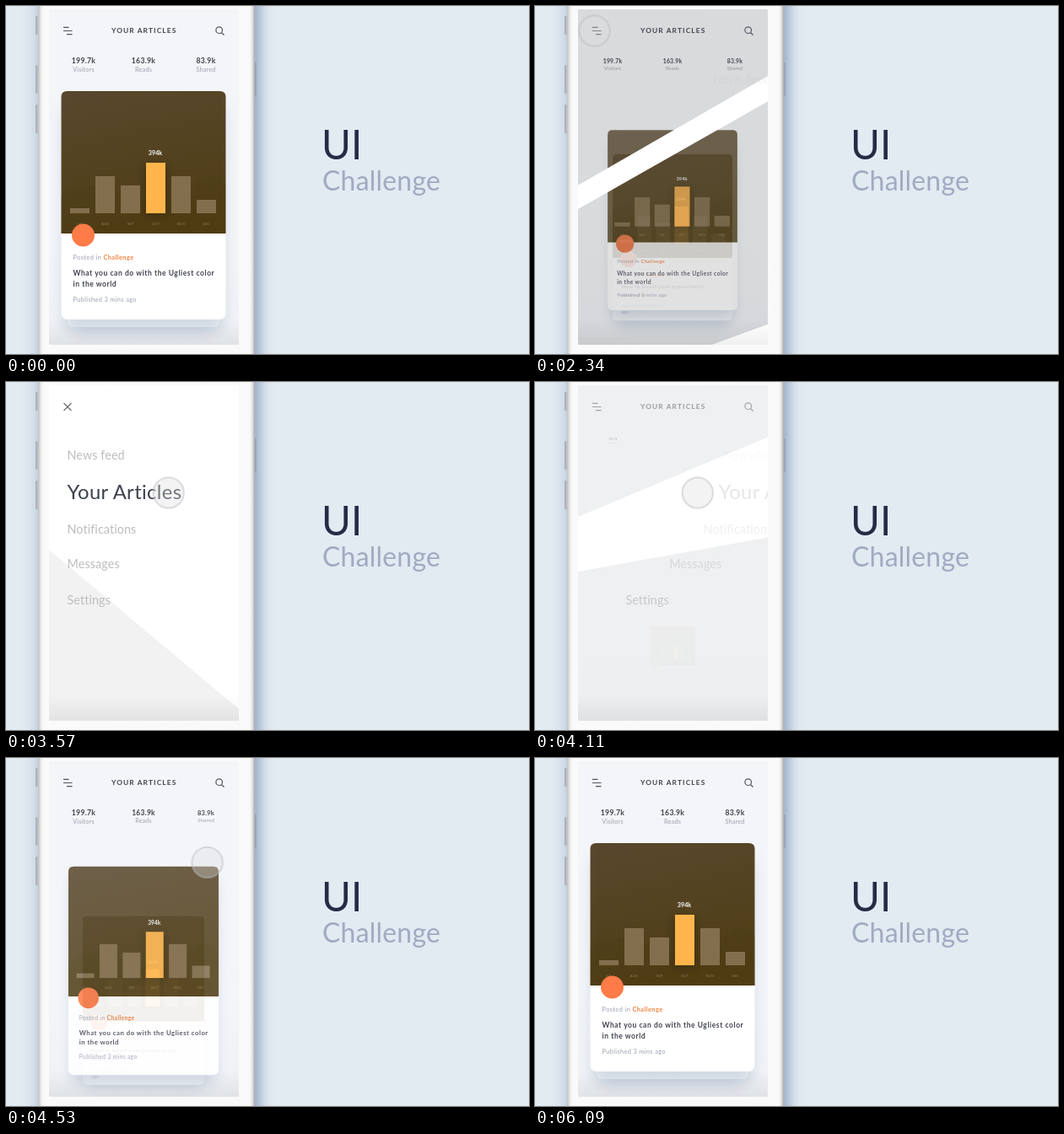
Recreate the animation shown at these times as an HTML page. Size 620 by 413 pixels, loop 6120 ms.

```html
<!DOCTYPE html>
<html lang="en">
<head>
<meta charset="utf-8">
<title>UI Challenge</title>
<style>
html, body { margin: 0; width: 100%; height: 100%; overflow: hidden; background: #e2eaf2; }
body { font-family: Lato, "Open Sans", sans-serif; }
.stage { position: absolute; left: 0; top: 0; width: 620px; height: 413px; overflow: hidden; background: #e2eaf2; }
.stage svg { position: absolute; left: 0; top: 0; display: block; }

.phone {
  position: absolute; left: 38px; top: -30px; width: 257px; height: 480px;
  background: linear-gradient(90deg, #c3bfbe, #d9d6d5 2px, #f1f0f0 4px, #fafafb 7px, #f9f9fa 251px, #efeded 253px, #d3cfce 255px, #a8a8ad);
  box-shadow: 6px 0 14px rgba(85, 115, 160, .5), -2px 0 16px rgba(120, 150, 185, .28);
}
.key { position: absolute; width: 3px; border-radius: 1px; background: linear-gradient(90deg, #b4b4b8, #d6d3d2); }

.screen { position: absolute; left: 51px; top: 4px; width: 225px; height: 398px; overflow: hidden; background: linear-gradient(#f3f5f8 70%, #eff2f5); }
.layer { position: absolute; inset: 0; }
.foot { top: 368px; background: linear-gradient(rgba(0,0,0,0), rgba(0,0,0,.06)); }

.paper, .dim, .wedge, .corner, .head, .cross, .front, .back, .stat, .item, .cursor {
  animation: 6120ms linear infinite both;
}
.paper { background: #fff; animation-name: paper; }
.dim { background: #000; animation-name: dim; }
.wedge { background: #fff; animation-name: wedge; }
.corner { background: #fff; animation-name: corner; }
.head { animation-name: head; }
.cross { animation-name: cross; }
.front { animation-name: front; }
.back { animation-name: back; }
.s0 { animation-name: stat0; }
.s1 { animation-name: stat1; }
.s2 { animation-name: stat2; }
.stat { transform-box: fill-box; transform-origin: center; }
.item { animation-name: item; animation-delay: calc(var(--i) * 40ms - 6120ms); }
.cursor { animation-name: cursor; }
.shade { filter: blur(9px); }
.glow { filter: blur(5px); }

@keyframes paper {
  0%, 34% { opacity: 0; }
  38.24% { opacity: .05; }
  41.18%, 63.24% { opacity: 1; }
  70.1% { opacity: .2; }
  73%, 100% { opacity: 0; }
}
@keyframes dim {
  0%, 32% { opacity: 0; }
  38.24% { opacity: .115; }
  41.3%, 63.24% { opacity: .05; }
  70.1% { opacity: .03; }
  73.8%, 100% { opacity: 0; }
}
@keyframes wedge {
  0%, 34.3% { clip-path: polygon(0 224px, 225px 94px, 225px 94px, 0 224px); animation-timing-function: ease-in; }
  38.24% { clip-path: polygon(0 209px, 225px 79px, 225px 109px, 0 237px); animation-timing-function: cubic-bezier(.4,.1,.3,1); }
  42.4%, 63.24% { clip-path: polygon(0 -2px, 225px -2px, 225px 384px, 0 195px); animation-timing-function: cubic-bezier(.5,0,.4,1); }
  70.1% { clip-path: polygon(0 217px, 225px 86px, 225px 102px, 0 231px); animation-timing-function: ease-out; }
  72.2%, 100% { clip-path: polygon(0 224px, 225px 94px, 225px 94px, 0 224px); }
}
@keyframes corner {
  0%, 35.5% { clip-path: polygon(225px 398px, 225px 398px, 225px 398px); opacity: 1; }
  38.24% { clip-path: polygon(159px 398px, 225px 374px, 225px 398px); opacity: 1; }
  41%, 100% { clip-path: polygon(60px 398px, 225px 330px, 225px 398px); opacity: 0; }
}
@keyframes head {
  0%, 38.7% { opacity: 1; }
  41.2%, 65.4% { opacity: 0; }
  69%, 100% { opacity: 1; }
}
@keyframes cross {
  0%, 39.7% { opacity: 0; }
  42.5%, 63.5% { opacity: 1; }
  66.2%, 100% { opacity: 0; }
}
@keyframes front {
  0%, 32.2% { transform: translate(163px, 236.5px) scale(1); opacity: 1; animation-timing-function: ease-in; }
  38.24% { transform: translate(163px, 254px) scale(.79); opacity: .78; }
  42% { transform: translate(163px, 305px) scale(.32); opacity: 0; }
  66% { transform: translate(163px, 330px) scale(.25); opacity: 0; animation-timing-function: ease-in; }
  70.1% { transform: translate(163px, 308.5px) scale(.44); opacity: .18; }
  74.02% { transform: translate(163px, 252.5px) scale(.913); opacity: .86; animation-timing-function: ease-out; }
  78.8%, 100% { transform: translate(163px, 236.5px) scale(1); opacity: 1; }
}
@keyframes back {
  0%, 32.2% { transform: translate(163px, 256px) scale(.923); opacity: .5; animation-timing-function: ease-in; }
  38.24% { transform: translate(163px, 274.5px) scale(.729); opacity: .6; }
  41.5% { transform: translate(163px, 315px) scale(.32); opacity: 0; }
  70.1% { transform: translate(163px, 330px) scale(.33); opacity: 0; }
  74.02% { transform: translate(163px, 288px) scale(.738); opacity: .5; animation-timing-function: ease-out; }
  81%, 100% { transform: translate(163px, 256px) scale(.923); opacity: .5; }
}
@keyframes stat0 {
  0%, 32.2% { transform: scale(1); opacity: 1; animation-timing-function: ease-in; }
  38.24% { transform: scale(.8); opacity: .95; }
  41.5%, 66% { transform: scale(.2); opacity: 0; }
  70.1% { transform: scale(.78); opacity: .95; animation-timing-function: ease-out; }
  73.8%, 100% { transform: scale(1); opacity: 1; }
}
@keyframes stat1 {
  0%, 32.2% { transform: scale(1); opacity: 1; animation-timing-function: ease-in; }
  38.24% { transform: scale(.8); opacity: .95; }
  41.5%, 67.3% { transform: scale(.2); opacity: 0; }
  70.1% { transform: scale(.57); opacity: .75; }
  74.02% { transform: scale(.97); opacity: 1; animation-timing-function: ease-out; }
  75.4%, 100% { transform: scale(1); opacity: 1; }
}
@keyframes stat2 {
  0%, 32.2% { transform: scale(1); opacity: 1; animation-timing-function: ease-in; }
  38.24% { transform: scale(.8); opacity: .95; }
  41.5%, 69% { transform: scale(.1); opacity: 0; }
  70.1% { transform: scale(.2); opacity: .25; }
  74.02% { transform: scale(.87); opacity: .95; animation-timing-function: ease-out; }
  77%, 100% { transform: scale(1); opacity: 1; }
}
@keyframes item {
  0%, 37.6% { transform: translateX(165px); opacity: 0; }
  38.24% { transform: translateX(139px); opacity: .2; animation-timing-function: cubic-bezier(.2,.5,.3,1); }
  43.4%, 63.24% { transform: none; opacity: 1; animation-timing-function: cubic-bezier(.5,0,.4,1); }
  67.2% { transform: translateX(150px); opacity: .1; }
  70.6% { transform: translateX(152px); opacity: .06; }
  72%, 100% { transform: translateX(165px); opacity: 0; }
}
@keyframes cursor {
  0%, 9.8% { transform: translate(300px, 140px); animation-timing-function: cubic-bezier(.3,.68,.6,1); }
  32.68%, 49.02% { transform: translate(70.5px, 29.5px); animation-timing-function: cubic-bezier(.4,0,.2,1); }
  58.6%, 71.2% { transform: translate(192.7px, 131.5px); animation-timing-function: ease-in; }
  74.02% { transform: translate(238px, 124px); animation-timing-function: ease-out; }
  77%, 100% { transform: translate(300px, 114px); }
}
</style>
</head>
<body>
<div class="stage">
  <div class="key" style="left:35px;top:12px;height:22px"></div>
  <div class="key" style="left:35px;top:70px;height:34px"></div>
  <div class="key" style="left:35px;top:117px;height:34px"></div>
  <div class="key" style="left:294px;top:67px;height:40px"></div>
  <div class="phone"></div>

  <div class="screen">
    <div class="layer paper"></div>
    <svg width="225" height="398" viewBox="51 4 225 398">
      <defs>
        <linearGradient id="earth" x1="0" y1="0" x2=".25" y2="1">
          <stop offset="0" stop-color="#58472d"/>
          <stop offset="1" stop-color="#503e15"/>
        </linearGradient>
      </defs>
      <g id="stats" text-anchor="middle"></g>
      <g class="back" id="back"></g>
      <g class="front" id="front"></g>
    </svg>
    <div class="layer dim"></div>
    <div class="layer wedge"></div>
    <div class="layer corner"></div>
    <svg width="225" height="398" viewBox="51 4 225 398">
      <g class="head" fill="none" stroke="#50545f" stroke-width="1.2">
        <path d="M68 25.3h6.5M68 29.5h10.5M72 33.7h6.5"/>
        <circle cx="252.7" cy="28.7" r="3.8"/>
        <path d="M255.5 31.5l3 3"/>
        <text x="125" y="32" font-size="8.4" font-weight="700" letter-spacing="1.1" fill="#41454f" stroke="none">YOUR ARTICLES</text>
      </g>
      <path class="cross" d="M68.5 25l9 9M77.5 25l-9 9" stroke="#666a70" stroke-width="1.1"/>
      <g id="menu"></g>
    </svg>
    <div class="layer foot"></div>
    <svg width="225" height="398" viewBox="51 4 225 398">
      <g class="cursor">
        <circle r="18.2" fill="#dcdde0" fill-opacity=".35" stroke="#b9bac0" stroke-opacity=".55" stroke-width="1.8"/>
      </g>
    </svg>
  </div>

  <svg width="620" height="413">
    <text x="374" y="181.5" font-size="47.5" fill="#242c46">UI</text>
    <text x="375" y="218.5" font-size="32" letter-spacing=".2" fill="#a0abc1">Challenge</text>
  </svg>
</div>

<script>
const fill = (id, html) => { document.getElementById(id).innerHTML = html; };

const label = (x, y, size, color, text, more = '') =>
  `<text x="${x}" y="${y}" font-size="${size}" fill="${color}" ${more}>${text}</text>`;

const bold = 'font-weight="700" letter-spacing=".25"';
const heading = 'font-weight="700" letter-spacing=".55"';
const mid = 'text-anchor="middle"';
const months = ['JUL', 'AUG', 'SEP', 'OCT', 'NOV', 'DEC'];
const heights = [6, 44, 33, 60, 44, 16];

// Card drawn around its own centre, 195 by 271
function card(peak, title, date) {
  const bars = heights.map((h, i) => {
    const x = -87 + 30 * i;
    return `<rect x="${x}" y="${9.5 - h}" width="23" height="${h}" fill="${i === 3 ? '#ffb54c' : '#836f4d'}"/>`
      + label(x + 11.5, 23.3, 4.4, '#8a7952', months[i], mid);
  }).join('');
  const lines = (rows, y, step, size, color, more) =>
    rows.map((row, i) => label(-83.5, y + i * step, size, color, row, more)).join('');
  return `
    <rect class="shade" x="-93" y="-118" width="186" height="264" rx="8" fill="#7890b4" opacity=".34"/>
    <rect x="-97.5" y="-135.5" width="195" height="271" rx="7" fill="#fff"/>
    <path d="M-97.5 33.5V-128.5q0-7 7-7H90.5q7 0 7 7V33.5z" fill="url(#earth)"/>
    <path d="M-97.5-12Q-62-34-18-10T52-16T97.5-26V33.5H-97.5z" fill="#46360f" opacity=".22"/>
    <rect class="glow" x="0" y="-48" width="29" height="60" fill="#2c2008" opacity=".4"/>
    ${bars}
    ${label(14, -59.7, 7.2, '#fff', peak, mid + ' font-weight="700"')}
    <circle cx="-71.5" cy="35.5" r="13.5" fill="#ff7b47"/>
    ${label(-83.5, 64, 7.4, '#9a9fb0', 'Posted in <tspan fill="#f0803c" font-weight="700">Challenge</tspan>', 'letter-spacing=".4"')}
    ${lines(title, 83.3, 13, 8.5, '#41444e', heading)}
    ${lines(date, 114.7, 10, 7.4, '#9a9fb0', 'letter-spacing=".35"')}`;
}

fill('front', card('394k', ['What you can do with the Ugliest color', 'in the world'], ['Published 3 mins ago']));
fill('back', card('264k', ['How to boost your productivity', 'every day'], ['Published 5 mins', 'ago']));

fill('stats', [[92, '199.7k', 'Visitors'], [163, '163.9k', 'Reads'], [237, '83.9k', 'Shared']]
  .map(([x, n, name], i) => `<g class="stat s${i}">`
    + label(x, 67.5, 8.7, '#41444e', n, bold)
    + label(x, 77.5, 7.3, '#9a9fab', name, 'letter-spacing=".2"') + '</g>').join(''));

fill('menu', [['News feed', 92], ['Your Articles', 138.5], ['Notifications', 179.5], ['Messages', 220.5], ['Settings', 264]]
  .map(([text, y], i) => `<g class="item" style="--i:${i}">`
    + (i === 1 ? label(72.5, y, 23.8, '#3d414c', text, 'letter-spacing=".35"') : label(72.5, y, 14.4, '#bdbdbf', text, 'letter-spacing=".08"')) + '</g>').join(''));
</script>
</body>
</html>
```
